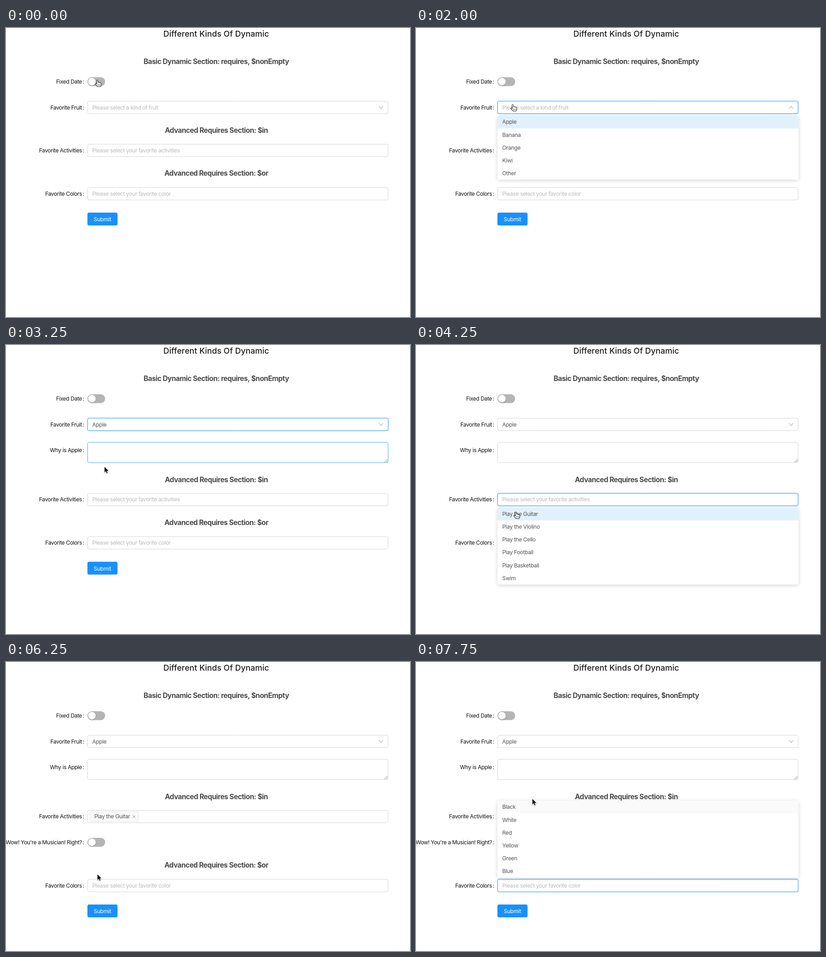
An HTML page with a canvas that plays this animation: 883x634 px, repeating every 8000 ms.

```html
<!DOCTYPE html>
<html lang="en">
<head>
<meta charset="utf-8">
<title>Dynamic form</title>
<style>
html, body { margin: 0; width: 100%; height: 100%; overflow: hidden; background: #fff; }
canvas { display: block; width: 883px; height: 634px; }
</style>
</head>
<body>
<canvas id="stage"></canvas>
<script>
const W = 883, H = 634, STEP = 250, LOOP = 8000;
const LEFT = 178, RIGHT = 835.5, ITEM = 28.15;
const BLUE = '#1890ff', FOCUS = '#40a9ff', BORDER = '#d6d6d6', INK = '#545454', HINT = '#b9b9b9';
const FAMILY = 'Inter, "Noto Sans", sans-serif';
const FRUITS = ['Apple', 'Banana', 'Orange', 'Kiwi', 'Other'];
const ACTIVITIES = ['Play the Guitar', 'Play the Violino', 'Play the Cello', 'Play Football', 'Play Basketball', 'Swim'];
const COLORS = ['Black', 'White', 'Red', 'Yellow', 'Green', 'Blue'];

// Pointer path: first step, shape, x, y
const POINTER = [
  [0, 'hand', 199.4, 114], [6, 'arrow', 164, 407], [7, 'arrow', 188, 262],
  [8, 'hand', 211.4, 167.5], [10, 'hand', 213, 199], [12, 'beam', 214, 236],
  [13, 'arrow', 215.5, 267.5], [14, 'arrow', 215, 306], [15, 'beam', 216, 339],
  [17, 'hand', 218, 366], [22, 'arrow', 119.5, 401.5], [24, 'arrow', 152, 438],
  [25, 'arrow', 200, 466], [26, 'beam', 240, 489], [27, 'beam', 243, 492],
  [29, 'hand', 247, 420], [30, 'hand', 252, 316], [31, 'arrow', 254.5, 300.5]
];

const canvas = document.getElementById('stage');
const ctx = canvas.getContext('2d');
const dpr = window.devicePixelRatio || 1;
canvas.width = W * dpr;
canvas.height = H * dpr;

function text(str, x, y, { size = 12, weight = 400, color = INK, align = 'left', gap = -0.32 } = {}) {
  ctx.font = `${weight} ${size}px ${FAMILY}`;
  ctx.letterSpacing = gap + 'px';
  ctx.textAlign = align;
  ctx.fillStyle = color;
  ctx.fillText(str, x, y + size * 0.364);
}

function box(x, y, w, h, r, fill, stroke) {
  ctx.beginPath();
  ctx.roundRect(x, y, w, h, r);
  if (fill) { ctx.fillStyle = fill; ctx.fill(); }
  if (stroke) { ctx.strokeStyle = stroke; ctx.stroke(); }
}

function line(points, color, width = 1) {
  ctx.beginPath();
  points.forEach(([x, y], i) => i ? ctx.lineTo(x, y) : ctx.moveTo(x, y));
  ctx.strokeStyle = color;
  ctx.lineWidth = width;
  ctx.stroke();
  ctx.lineWidth = 1;
}

function shadow(color, blur, dy) {
  ctx.shadowColor = color;
  ctx.shadowBlur = blur * dpr;
  ctx.shadowOffsetY = dy * dpr;
}

function label(str, y) {
  const style = { color: '#111', align: 'right', gap: -0.36 };
  text(str, 166, y, style);
  text(':', 170.6, y, style);
}

function heading(str, y) {
  text(str, 459.7, y, { size: 15.4, weight: 700, color: '#4b4b4b', align: 'center', gap: -0.49 });
}

function field(y, { focus = 0, right = RIGHT, h = 28 } = {}) {
  const top = y - 14, w = right - LEFT;
  if (focus > 1) box(LEFT - 1, top - 1, w + 2, h + 2, 4.5, 'rgba(24,144,255,.28)');
  box(LEFT + 0.4, top + 0.4, w - 0.8, h - 0.8, 3.5, '#fff', focus ? FOCUS : BORDER);
}

function chevron(y, up) {
  const d = up ? -2.6 : 2.6;
  line([[815.5, y - d], [819.8, y + d], [824.1, y - d]], '#b0b0b0', 1.1);
}

function toggle(y, on, color = BLUE) {
  box(LEFT, y - 9.8, 38.7, 19.6, 9.8, on ? color : '#b5b5b5');
  if (on) box(LEFT + 0.5, y - 9.3, 37.7, 18.6, 9.3, null, BLUE);
  ctx.save();
  shadow('rgba(0,35,11,.2)', 3, 1.5);
  ctx.beginPath();
  ctx.arc(on ? 206.4 : 187.8, y, 8.2, 0, Math.PI * 2);
  ctx.fillStyle = '#fff';
  ctx.fill();
  ctx.restore();
}

function menu(items, top, { active = -1, tint = '#e1f1fb', chosen = -1, opacity = 1, scale = 1 } = {}) {
  const w = 658, h = items.length * ITEM;
  ctx.save();
  ctx.translate(0, top + h);
  ctx.scale(1, scale);
  ctx.translate(0, -top - h);
  ctx.globalAlpha = opacity;
  ctx.save();
  shadow('rgba(0,0,0,.17)', 8, 2);
  box(LEFT, top, w, h, 3.5, '#fff');
  ctx.restore();
  items.forEach((item, i) => {
    const y = top + i * ITEM;
    if (i === active) box(LEFT, y, w, ITEM, i ? 0 : [3.5, 3.5, 0, 0], tint);
    text(item, 188.5, y + ITEM / 2, i === chosen ? { weight: 600, gap: -0.45 } : {});
    if (i === chosen) line([[815.3, y + 14], [818.3, y + 17.2], [824.3, y + 10.2]], BLUE, 1.3);
  });
  ctx.restore();
}

function tag(str, y) {
  box(183.4, y - 10.5, 106.2, 21, 2, '#fafafa', '#e4e4e4');
  text(str, 193, y);
  line([[277.4, y - 2.6], [282.6, y + 2.6]], '#8c8c8c');
  line([[277.4, y + 2.6], [282.6, y - 2.6]], '#8c8c8c');
}

function resizeGrip(y) {
  line([[827, y], [834, y - 7]], '#666', 0.9);
  line([[831, y], [834, y - 3]], '#666', 0.9);
}

const SHAPES = {
  arrow: new Path2D('M0 0V11.9L2.7 9.3L4.5 13.5L6.4 12.7L4.6 8.6H8.3Z'),
  hand: new Path2D('M-1.6 1.5Q-.2 -1 1.3 1.5L2 5.4Q3.5 4.3 4.6 5.8Q6 5 7 6.4Q8.7 6.1 8.9 8L8.5 11.4L7.4 14.7H.5L-3.8 9.7Q-5 7.5 -3.1 7.2L-.6 9Z'),
  fingers: new Path2D('M1.6 9.8V12.4M3.8 9.8V12.4M6 9.8V12.4'),
  beam: new Path2D('M-3 -6Q0 -6 0 -4Q0 -6 3 -6M0 -4V4M-3 6Q0 6 0 4Q0 6 3 6M-1.5 1.5H1.5')
};

function pointer(step) {
  const [, kind, x, y] = POINTER.filter(p => p[0] <= step).pop();
  const stroke = (path, color, width) => {
    ctx.strokeStyle = color;
    ctx.lineWidth = width;
    ctx.stroke(path);
  };
  ctx.save();
  ctx.translate(x, y);
  ctx.lineJoin = 'round';
  if (kind === 'beam') {
    stroke(SHAPES.beam, '#fff', 2.6);
    stroke(SHAPES.beam, '#222', 1.2);
  } else if (kind === 'arrow') {
    ctx.save();
    shadow('rgba(0,0,0,.35)', 2, 1);
    stroke(SHAPES.arrow, '#fff', 1.8);
    ctx.restore();
    ctx.fillStyle = '#000';
    ctx.fill(SHAPES.arrow);
  } else {
    ctx.fillStyle = '#fff';
    ctx.fill(SHAPES.hand);
    stroke(SHAPES.hand, '#222', 1.1);
    stroke(SHAPES.fingers, '#333', 0.9);
  }
  ctx.restore();
}

function draw(step) {
  const within = (a, b) => step >= a && step <= b;
  const dated = within(1, 3), apple = step >= 11, guitar = step >= 18;
  const fruitOpen = within(8, 10), actOpen = within(16, 22), colorOpen = step >= 28;

  ctx.setTransform(dpr, 0, 0, dpr, 0, 0);
  ctx.fillStyle = '#fff';
  ctx.fillRect(0, 0, W, H);

  text('Different Kinds Of Dynamic', 459.5, 12.8, { size: 17.6, weight: 500, color: '#1c1c1c', align: 'center', gap: 0.1 });
  heading('Basic Dynamic Section: requires, $nonEmpty', 73);
  label('Fixed Date', 118);
  toggle(117.8, within(1, 4), step === 4 ? '#3291ee' : BLUE);

  let y = 174.2;
  if (dated) {
    label('Date', y);
    field(y, { right: 328 });
    text('Select date', 188.5, y, { color: HINT });
    box(309.5, y - 4.5, 9, 9, 1, null, '#bbb');
    line([[309.5, y - 1.5], [318.5, y - 1.5]], '#bbb');
    y += 56.4;
  }

  label('Favorite Fruit', y);
  field(y, { focus: within(8, 15) ? 2 : 0 });
  text(apple ? 'Apple' : 'Please select a kind of fruit', 188.5, y, { color: apple ? INK : HINT });
  chevron(y, fruitOpen);

  if (apple) {
    label('Why is Apple', 230.8);
    field(227, { focus: within(12, 13) ? 1 : 0, h: 45.5 });
    resizeGrip(257.3);
    y += 70.5;
  }

  heading('Advanced Requires Section: $in', y + 50.3);
  y += 94.4;
  label('Favorite Activities', y);
  field(y, { focus: actOpen ? 2 : step === 15 || step === 23 ? 1 : 0 });
  if (guitar) tag('Play the Guitar', y);
  else text('Please select your favorite activities', 188.5, y, { color: HINT });

  if (guitar) {
    y += 56.4;
    label("Wow! You're a Musician! Right?", y);
    toggle(y, false);
  }

  heading('Advanced Requires Section: $or', y + 50);
  y += 95;
  label('Favorite Colors', y);
  field(y, { focus: step > 28 ? 2 : step > 25 ? 1 : 0 });
  text('Please select your favorite color', 188.5, y, { color: HINT });
  if (within(28, 29)) line([[184.5, y - 7], [184.5, y + 7]], '#555');

  y += 55.4;
  ctx.save();
  shadow('rgba(0,0,0,.08)', 2, 1.5);
  box(LEFT, y - 14, 65.7, 28, 3.5, BLUE);
  ctx.restore();
  text('Submit', 210.8, y + 0.8, { color: '#fff', align: 'center', gap: -0.2 });

  if (fruitOpen) menu(FRUITS, 192, { active: 0 });
  if (actOpen) {
    menu(ACTIVITIES, 356.6, { active: 0, chosen: guitar ? 0 : -1, tint: guitar ? '#e9f1f6' : '#e1f1fb' });
  }
  if (colorOpen) {
    const opening = step === 28;
    menu(COLORS, 304, {
      active: step === 29 ? 4 : 0,
      tint: step === 31 ? '#fafafa' : '#e1f0fa',
      opacity: opening ? 0.94 : 1,
      scale: opening ? 0.993 : 1
    });
  }
  pointer(step);
}

const start = performance.now();
function tick(now) {
  const t = Math.max(0, now - start) % LOOP;
  draw(Math.floor(t / STEP));
  requestAnimationFrame(tick);
}
draw(0);
requestAnimationFrame(tick);
</script>
</body>
</html>
```
